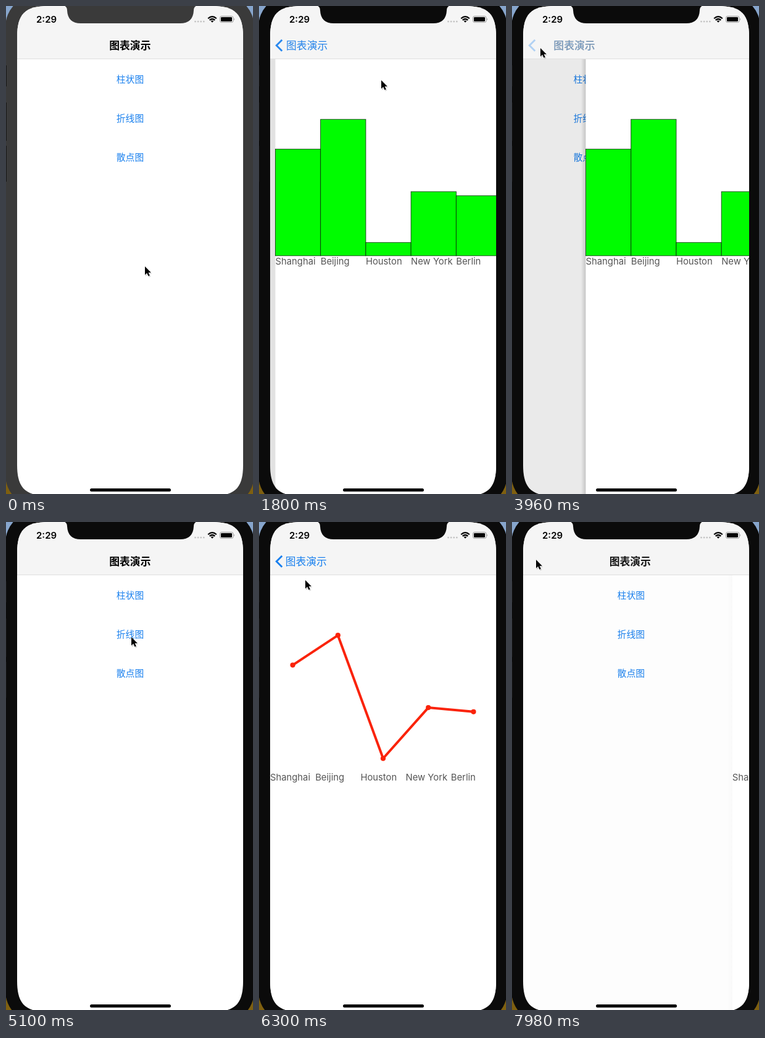
Write an HTML page that moves like this. It is 400 px wide and 789 px high and loops after 8000 ms.

```html
<!DOCTYPE html>
<html lang="zh-CN">
<head>
<meta charset="utf-8">
<title>图表演示</title>
<style>
  html, body { margin: 0; width: 100%; height: 100%; overflow: hidden; background: #000; }
  svg { display: block; width: 100%; height: 100%; }
  text { font-family: Inter, "Noto Sans CJK SC", "Noto Sans CJK", sans-serif; }
  .zh { font-family: "Noto Sans CJK SC", "Noto Sans CJK", sans-serif; }
  .item { font-size: 14.8px; fill: #1a80ee; text-anchor: middle; }
  .heading { font-size: 16.8px; }
  .city { font-size: 14.8px; fill: #555; }
</style>
</head>
<body>
<svg viewBox="0 0 400 789">
  <defs>
    <clipPath id="screenClip"><path id="screen"/></clipPath>
    <clipPath id="pageClip"><rect x="18" y="85.5" width="366" height="707"/></clipPath>
    <linearGradient id="edge"><stop offset="0" stop-opacity="0"/><stop offset="1" stop-opacity=".22"/></linearGradient>
    <linearGradient id="desk" x2="0" y2="1">
      <stop offset="0" stop-color="#86a5cd"/><stop offset=".1" stop-color="#8fa9c8"/>
      <stop offset=".9" stop-color="#6b5a20"/><stop offset="1" stop-color="#80600f"/>
    </linearGradient>
  </defs>

  <rect width="400" height="789" fill="url(#desk)"/>
  <rect id="body" x="-1" y="-18" width="403" height="828" rx="52"/>
  <path d="M.5 96V130M.5 156V218M.5 226V284" stroke="#151515"/>

  <g clip-path="url(#screenClip)">
    <rect x="18" width="366" height="792" fill="#fff"/>
    <g clip-path="url(#pageClip)">
      <g id="list">
        <text class="zh item" x="201" y="124.4">柱状图</text>
        <text class="zh item" x="201" y="187.2">折线图</text>
        <text class="zh item" x="201" y="250.4">散点图</text>
      </g>
      <rect id="dim" x="18" y="85" width="366" height="707"/>
      <g id="page">
        <rect id="shadow" x="10" y="85" width="8" height="707" fill="url(#edge)"/>
        <rect x="18" y="85" width="366" height="707" fill="#fff"/>
        <g id="bars" fill="#00fc00" stroke="#0a280a" stroke-width=".8"/>
        <g id="line" fill="#fa230a"/>
        <g id="cities"/>
      </g>
    </g>

    <rect x="18" width="366" height="85" fill="#f5f5f5"/>
    <path d="M18 85.5H384" stroke="#dedede"/>
    <path id="chevron" d="M37.3 54.8L28.3 63.8L37.3 72.8" fill="none" stroke="#1a80ee" stroke-width="2.9"/>
    <text id="back" class="zh heading" y="69.8" fill="#1a80ee">图表演示</text>
    <text id="title" class="zh heading" y="69.8" font-weight="600">图表演示</text>

    <text x="49" y="27" font-size="15" font-weight="600">2:29</text>
    <path d="M306.5 25.2H321" stroke="#c4c4c4" stroke-width="2.8" stroke-linecap="round" stroke-dasharray="0 4.6"/>
    <g fill="none" stroke="#000" stroke-width="2.2">
      <path d="M327.2 20.3Q334 14 340.8 20.3M329.7 22.9Q334 19.1 338.3 22.9"/>
      <path d="M331.6 24.3Q334 22.6 336.4 24.3L334 26.8Z" fill="#000" stroke="none"/>
    </g>
    <rect x="346.5" y="16.5" width="21.5" height="10" rx="2.6" fill="none" stroke="#999"/>
    <rect x="348" y="18" width="18" height="7" rx="1.3"/>
    <path d="M369.3 19.8Q371.2 21.5 369.3 23.2Z" fill="#999"/>
    <rect x="136" y="780" width="131" height="5" rx="2.5"/>
  </g>

  <path id="notch" d="M92 -1Q99 0 99 7Q100 28 121 28H282Q303 28 304 7Q304 0 311 -1Z"/>
  <circle id="ring" r="22.8" fill="none" stroke="#000" stroke-width="1.7"/>
  <g id="cursor">
    <path d="M1 2V17L4.6 13.7L7 18.8L10 17.4L7.7 12.6H12Z" fill="#000" opacity=".16"/>
    <path d="M0 0V14.6L3.4 11.4L5.8 16.6L8.2 15.5L5.9 10.5H10.4Z" stroke="#fff" stroke-width="1" paint-order="stroke"/>
  </g>
</svg>
<script>
  const LOOP = 8000, STEP = 60, WIDTH = 366, HEIGHT = 792, LEFT = 18, SLOT = WIDTH / 5, BASE = 403.8;
  const data = [['Shanghai', 231.3], ['Beijing', 183.2], ['Houston', 382.3], ['New York', 300.1], ['Berlin', 306.8]];

  // start, list visible afterwards, chart on the moving page
  const transitions = [
    [1396, false, 'bars'], [3886, true, 'bars'],
    [5240, false, 'line'], [7676, true, 'line']
  ];
  const clicks = [[1290, 1400], [3780, 3885], [5130, 5240], [7570, 7680]];
  const BLACK_AT = 1380;
  // time, x, y of the pointer tip
  const path = [
    [0, 225, 421], [250, 225, 421], [1150, 198, 120], [2300, 198, 120],
    [3200, 46, 68], [4300, 46, 68], [4980, 203, 186], [5500, 203, 186],
    [6300, 75, 94], [6700, 39, 61], [LOOP, 39, 61]
  ];

  const $ = id => document.getElementById(id);
  const set = (id, attrs) => {
    for (const key in attrs) $(id).setAttribute(key, attrs[key]);
  };
  const show = (id, on) => set(id, { display: on ? 'inline' : 'none' });
  const slotX = i => LEFT + i * SLOT;
  const midX = i => slotX(i) + SLOT / 2;

  // Screen outline with continuous corners: long curves, tight in the middle.
  function screenPath(reach = 50, grip = 13) {
    const w = WIDTH - 2 * reach, h = HEIGHT - 2 * reach, r = reach, g = reach - grip;
    return `M${LEFT + r} 0h${w}c${g} 0 ${r} ${grip} ${r} ${r}v${h}c0 ${g} ${-grip} ${r} ${-r} ${r}` +
      `h${-w}c${-g} 0 ${-r} ${-grip} ${-r} ${-r}v${-h}c0 ${-g} ${grip} ${-r} ${r} ${-r}z`;
  }

  set('screen', { d: screenPath() });
  $('bars').innerHTML = data.map(([, y], i) =>
    `<rect x="${slotX(i)}" y="${y}" width="${SLOT}" height="${BASE - y}"/>`).join('');
  $('cities').innerHTML = data.map(([name], i) =>
    `<text class="city" x="${slotX(i)}" y="418.3">${name}</text>`).join('');
  $('line').innerHTML =
    `<polyline points="${data.map(([, y], i) => [midX(i), y])}" fill="none" stroke="#fa230a" stroke-width="4"/>` +
    data.map(([, y], i) => `<circle cx="${midX(i)}" cy="${y}" r="4.1"/>`).join('');

  const spring = ms => {
    const x = Math.max(0, ms) * 0.014;
    return 1 - (1 + x) * Math.exp(-x);
  };
  const smooth = u => u * u * (3 - 2 * u);

  function pointer(t) {
    const i = Math.max(1, path.findIndex(k => k[0] >= t));
    const [t0, x0, y0] = path[i - 1], [t1, x1, y1] = path[i];
    const u = smooth((t - t0) / (t1 - t0));
    return [x0 + (x1 - x0) * u, y0 + (y1 - y0) * u];
  }

  function render(t) {
    const [start, toList, chart] = transitions.filter(tr => tr[0] <= t).pop() || [-LOOP, true, 'bars'];
    const s = spring(t - start);
    const p = toList ? s : 1 - s;               // 1: list in front, 0: chart in front
    const q = p - 0.55 * p * (1 - p) ** 2;      // headings lag a little behind

    set('list', { transform: `translate(${-0.3 * WIDTH * (1 - p)})` });
    set('dim', { opacity: 0.115 * (1 - p) });
    set('page', { transform: `translate(${WIDTH * p})` });
    set('shadow', { opacity: toList ? 1 - p : 0 });
    show('page', p < 0.997);
    show('bars', chart === 'bars');
    show('line', chart === 'line');

    const headX = 42.7 + 124.6 * q;
    set('back', { x: headX, opacity: (1 - p) ** 2.4 });
    set('title', { x: headX, opacity: p ** 1.2 });
    set('chevron', { opacity: (1 - p) ** 3.6 });

    const shell = t < BLACK_AT ? '#3a3a3a' : '#0b0b0b';
    set('body', { fill: shell });
    set('notch', { fill: shell });

    const [x, y] = pointer(t);
    set('cursor', { transform: `translate(${x} ${y}) scale(.95)` });
    set('ring', { cx: x, cy: y });
    show('ring', clicks.some(([from, to]) => t >= from && t < to));
  }

  const origin = performance.now();
  function tick() {
    const t = (performance.now() - origin) % LOOP;
    render(Math.floor((t + 4) / STEP) * STEP);
    requestAnimationFrame(tick);
  }
  tick();
</script>
</body>
</html>
```
